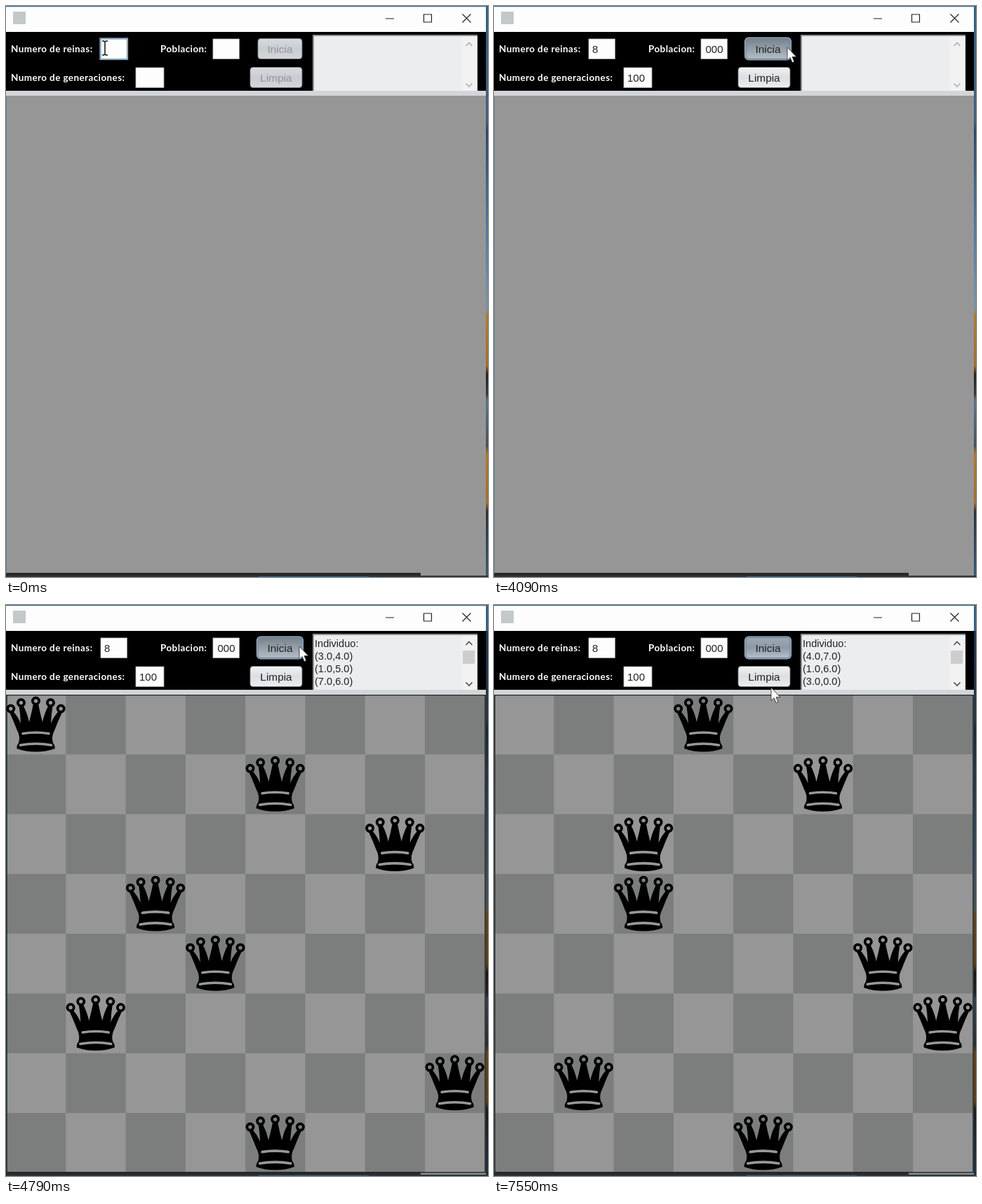
An HTML page for the animation above (8.46 s loop, 687 by 815 pixels).

```html
<!DOCTYPE html>
<html lang="es">
<head>
<meta charset="utf-8">
<title>Reinas</title>
<style>
  html, body { margin: 0; width: 100%; height: 100%; overflow: hidden; background: #969696; }
  svg { display: block; width: 687px; height: 815px; }
  text { white-space: pre; }
  .label { font: bold 13.5px Lato, sans-serif; letter-spacing: .4px; fill: #fff; }
  .ui { font: 15px "Liberation Sans", Arial, sans-serif; fill: #222; }
  .button text { font-size: 15.4px; text-anchor: middle; }
  .button.off text { fill: #92969a; }
  .list { font-size: 14.6px; }
  .ring { fill: none; stroke: #8eabc5; stroke-width: 2.2; }
  .line { fill: none; stroke: #222; stroke-width: 1.2; }
</style>
</head>
<body>
<svg id="stage" viewBox="0 0 687 815">
  <defs>
    <linearGradient id="plain" x2="0" y2="1">
      <stop stop-color="#f1f2f3"/><stop offset=".5" stop-color="#dcdfe2"/><stop offset="1" stop-color="#eceef0"/>
    </linearGradient>
    <linearGradient id="dim" x2="0" y2="1">
      <stop stop-color="#d8dbde"/><stop offset=".5" stop-color="#c9cdd2"/><stop offset="1" stop-color="#d3d7da"/>
    </linearGradient>
    <linearGradient id="pressed" x2="0" y2="1">
      <stop stop-color="#77828d"/><stop offset=".5" stop-color="#949fa9"/><stop offset="1" stop-color="#b3bdc6"/>
    </linearGradient>
    <linearGradient id="focused" x2="0" y2="1">
      <stop stop-color="#9da8b2"/><stop offset=".5" stop-color="#8d9aa6"/><stop offset="1" stop-color="#b4c0ca"/>
    </linearGradient>
    <linearGradient id="desktop" x2="0" y2="1">
      <stop stop-color="#2d638c"/><stop offset=".2" stop-color="#3e607b"/>
      <stop offset=".22" stop-color="#24486c"/><stop offset=".4" stop-color="#4a7fa9"/>
      <stop offset=".53" stop-color="#7894a6"/><stop offset=".54" stop-color="#b37a22"/>
      <stop offset=".63" stop-color="#a86d1d"/><stop offset=".645" stop-color="#25221f"/>
      <stop offset=".68" stop-color="#35383a"/><stop offset=".69" stop-color="#547590"/>
      <stop offset=".77" stop-color="#41515b"/><stop offset=".785" stop-color="#b5771d"/>
      <stop offset=".87" stop-color="#a96d1b"/><stop offset=".885" stop-color="#26323c"/>
      <stop offset="1" stop-color="#315a79"/>
    </linearGradient>
    <g id="queen">
      <path d="M4.500 24Q11 38 15.500 50Q21 60 18 69Q15 72 15.500 77Q28 81.500 42.500 81.500T69.500 77Q70 72 67 69Q64 60 69.500 50Q74 38 80.500 24L75.500 23Q68 31 64 41Q64.500 28 66.500 16L60.500 15.500Q54.500 27 52 39Q48.500 26 46 13H39Q36.500 26 33 39Q30.500 27 24.500 15.500L18.500 16Q20.500 28 21 41Q17 31 9.500 23Z"/>
      <g fill="none" stroke="#000" stroke-width="3.800" id="crown"></g>
      <path d="M24 55.500Q42.500 52.500 61 55.500M20.500 72Q42.500 68 64.500 72" fill="none" stroke="#999" stroke-width="3.600" stroke-linecap="round"/>
    </g>
  </defs>

  <rect width="687" height="815" fill="#969696"/>
  <rect x="684" width="3" height="815" fill="url(#desktop)"/>
  <rect id="shade" x="684" y="37" width="3" height="778" opacity=".45"/>
  <g id="cells" fill="#7c7e7d"></g>
  <path d="M0 813H687V815H0Z" fill="#29343d"/>
  <path d="M360 814H517V815H360Z" fill="#2d6593"/>
  <path d="M0 809H591V813H0Z" fill="#292929"/>
  <path d="M.5 128V810" stroke="#6d7c84"/>
  <path id="frame" d="M1 810V128.500H683V810Z" fill="none" stroke="#252829" stroke-width="1.600"/>
  <g id="queens"></g>

  <rect width="684" height="37" fill="#fdfdfd"/>
  <rect width="687" height="1.200" fill="#346c8d"/>
  <rect x="10" y="8" width="18" height="18" fill="#c3c8cb"/>
  <path class="line" d="M541 18H553M595.500 12H606.500V23H595.500ZM650.500 11.500L662.500 23.500M662.500 11.500L650.500 23.500"/>
  <rect y="37" width="684" height="84.500"/>
  <rect y="121" width="684" height="7" fill="#d3d6d8"/>

  <text class="label" x="7" y="66">Numero de reinas:</text>
  <text class="label" x="220" y="66">Poblacion:</text>
  <text class="label" x="7" y="107">Numero de generaciones:</text>
  <g id="fields"></g>
  <g id="buttons"></g>

  <rect x="437" y="41" width="235" height="80" fill="#ebedee"/>
  <path d="M438 121V42H672" fill="none" stroke="#8d9092" stroke-width="2"/>
  <rect x="650" y="43" width="20" height="78" fill="#f2f2f2"/>
  <rect id="thumb" x="651" y="65" width="17" height="19" fill="#cdcdcd"/>
  <path id="arrows" d="M655.500 57L660 52.500L664.500 57M655.500 110.500L660 115L664.500 110.500" fill="none" stroke-width="1.700"/>
  <g id="list" class="ui list"></g>

  <path id="ibeam" d="M-4 -10H-1.500L0 -9L1.500 -10H4M0 -9V9M-4 10H-1.500L0 9L1.500 10H4" fill="none" stroke="#111" stroke-width="1.500"/>
  <path id="arrow" d="M0 0V18.500L4.200 14.600L7 21.600L9.900 20.400L7.100 13.600H13Z" fill="#fff" stroke="#333" stroke-width=".9"/>
</svg>
<script>
const LOOP = 8460, CELL = 85.3, TOP = 128, DIGIT = 8.34;
const PRESS = 4090, FIRST = 4790, SECOND = 5210;
const $ = id => document.getElementById(id);

function add(parent, tag, attrs = {}, content = '') {
  const node = document.createElementNS('http://www.w3.org/2000/svg', tag);
  for (const key in attrs) node.setAttribute(key, attrs[key]);
  node.textContent = content;
  return parent.appendChild(node);
}
const show = (node, on) => node.setAttribute('visibility', on ? 'visible' : 'hidden');
const latest = (steps, t) => steps.filter(s => s[0] <= t).pop();

for (const [cx, cy] of [[6.8, 20], [21.5, 11.5], [42.5, 9], [63.5, 11.5], [78.2, 20]])
  add($('crown'), 'circle', { cx, cy, r: 4.6 });

// Dark squares turn up in two passes.
const cells = [];
for (let row = 0; row < 8; row++)
  for (let col = 0; col < 8; col++) {
    if ((row + col) % 2 === 0) continue;
    const early = row < 5 || (row === 6 && col < 7);
    const node = add($('cells'), 'rect', {
      x: col * CELL, y: TOP + row * CELL, width: CELL, height: CELL
    });
    cells.push({ node, from: early ? 4230 : 4440 });
  }

function makeSolution(columns, points) {
  const board = add($('queens'), 'g');
  columns.forEach((col, row) =>
    add(board, 'use', { href: '#queen', x: col * CELL, y: TOP + row * CELL }));
  const list = add($('list'), 'g');
  ['Individuo:', ...points].forEach((line, i) =>
    add(list, 'text', { x: 440, y: 59.5 + i * 18 }, line));
  return [board, list];
}
const first = makeSolution([0, 4, 6, 2, 3, 1, 7, 4], ['(3.0,4.0)', '(1.0,5.0)', '(7.0,6.0)']);
const second = makeSolution([3, 5, 2, 2, 6, 7, 1, 4], ['(4.0,7.0)', '(1.0,6.0)', '(3.0,0.0)']);

function makeField(x, y, width, textX, focus, blur, typed) {
  const g = add($('fields'), 'g');
  add(g, 'rect', { x, y, width, height: 28.5, fill: '#fdfdfd', stroke: '#aaa', 'stroke-width': .8 });
  const ring = add(g, 'rect', {
    x: x - .5, y: y - .5, width: width + 1, height: 29.5, class: 'ring'
  });
  const text = add(g, 'text', { x: textX, y: y + 19.5, class: 'ui' });
  const caret = add(g, 'rect', { y: y + 5, width: 1.2, height: 18, fill: '#222' });
  return { x, y, width, textX, focus, blur, typed, ring, text, caret };
}
const fields = [
  makeField(135, 47, 37.5, 140, 0, 1100, [[-500, ''], [270, '8']]),
  makeField(295, 47, 37.5, 301.5, 1100, 2980,
    [[1100, ''], [1310, '1'], [1450, '10'], [1590, '100'], [1660, '000']]),
  makeField(185, 88, 40, 190, 2980, PRESS,
    [[2980, ''], [3050, '1'], [3120, '10'], [3260, '100']])
];

function makeButton(x, y, width, label) {
  const g = add($('buttons'), 'g', { class: 'button' });
  const ring = add(g, 'rect', { x: x - 1, y: y - 1, width: width + 2, height: 31, rx: 5, class: 'ring' });
  const face = add(g, 'rect', { x, y, width, height: 29, rx: 4, stroke: '#737a81', 'stroke-width': .8 });
  add(g, 'text', { x: x + width / 2, y: y + 20, class: 'ui' }, label);
  return { g, ring, face };
}
const start = makeButton(359, 46.5, 63, 'Inicia');
const clear = makeButton(348, 87.5, 74, 'Limpia');

function paintButton(button, on, fill, focus) {
  button.g.setAttribute('class', on ? 'button' : 'button off');
  button.face.setAttribute('fill', `url(#${on ? fill : 'dim'})`);
  show(button.ring, focus);
}

// Pointer stops: time, x, y.
const path = [
  [0, 141, 60], [400, 141, 60], [1060, 326, 61], [1940, 326, 61],
  [2770, 207, 106], [2840, 211, 104], [3670, 211, 104], [4060, 418, 59],
  [5210, 418, 59], [5420, 404, 110], [5490, 400, 117], [6170, 400, 117],
  [6240, 398, 117.5], [6380, 398, 117.5], [6520, 395, 118], [LOOP, 395, 118]
];
function pointer(t) {
  const i = path.findIndex(p => p[0] > t);
  const [t0, x0, y0] = path[i - 1], [t1, x1, y1] = path[i];
  const u = (t - t0) / (t1 - t0), k = u * u * (3 - 2 * u);
  return [x0 + (x1 - x0) * k, y0 + (y1 - y0) * k];
}

function render(t) {
  for (const f of fields) {
    const focused = t >= f.focus && t < f.blur;
    const [since, value] = latest(f.typed, t) || [0, ''];
    f.text.textContent = value;
    f.caret.setAttribute('x', f.textX + value.length * DIGIT);
    show(f.ring, focused);
    show(f.caret, focused && (t - since) % 1000 < 500);
  }

  const ready = t >= 3260, pressed = t >= PRESS;
  paintButton(start, ready, !pressed ? 'plain' : t < SECOND ? 'pressed' : 'focused', pressed);
  paintButton(clear, ready, 'plain', false);

  const solved = t >= FIRST;
  cells.forEach(c => show(c.node, t >= c.from));
  first.forEach(node => show(node, solved && t < SECOND));
  second.forEach(node => show(node, t >= SECOND));
  for (const id of ['frame', 'thumb', 'shade']) show($(id), solved);
  $('arrows').setAttribute('stroke', solved ? '#505050' : '#b0b0b0');

  const [x, y] = pointer(t);
  const typing = fields.some(f => x > f.x && x < f.x + f.width && y > f.y && y < f.y + 28);
  for (const id of ['ibeam', 'arrow']) $(id).setAttribute('transform', `translate(${x} ${y})`);
  show($('ibeam'), typing);
  show($('arrow'), !typing);
}

const began = performance.now();
function tick() {
  render((performance.now() - began) % LOOP);
  requestAnimationFrame(tick);
}
tick();
</script>
</body>
</html>
```
